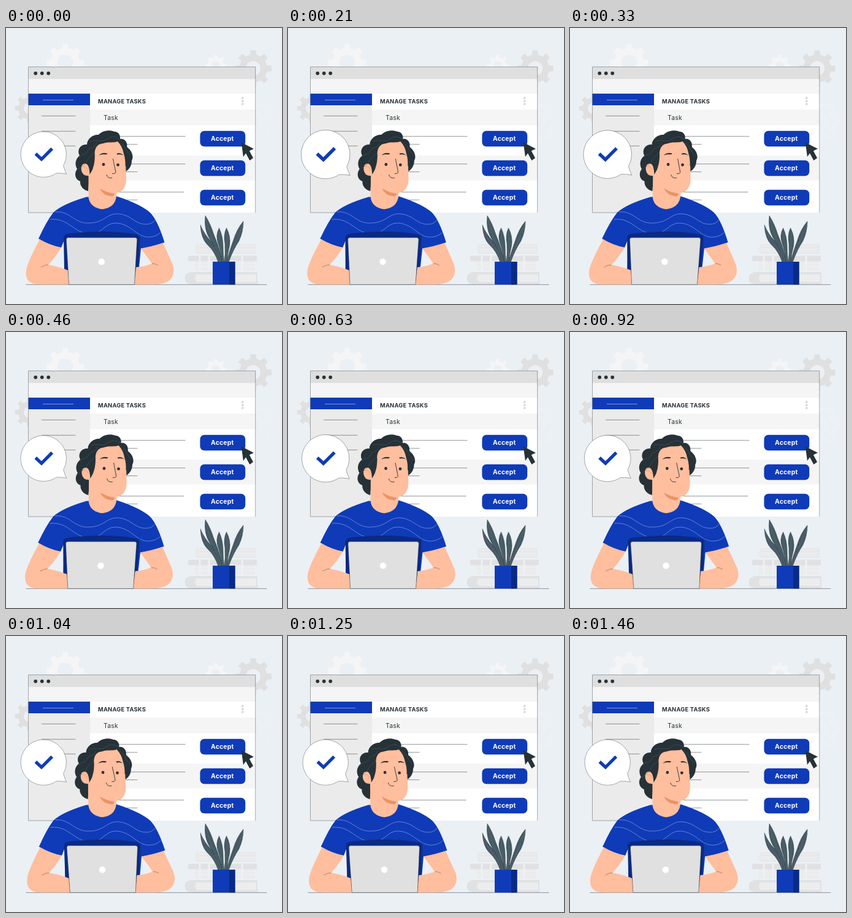
An HTML page that plays this animation: 450 by 450 pixels, repeating every 1500 ms.

```html
<!DOCTYPE html>
<html lang="en">
<head>
<meta charset="utf-8">
<title>Manage tasks</title>
<style>
  html, body { margin: 0; width: 100%; height: 100%; overflow: hidden; background: #ebf0f5; }
  svg { display: block; width: 100vw; height: 100vh; }
  text { font-family: Inter, "Open Sans", sans-serif; letter-spacing: .25px; }
  .blue { fill: #0f3bb8; }
  .navy { fill: #0a2a83; }
  .skin { fill: #ffbe9d; }
  .hair { fill: #263238; }
  .line { fill: none; stroke: #263238; stroke-width: .5; stroke-linecap: round; stroke-linejoin: round; }
  .thin { fill: none; stroke: #263238; stroke-width: .4; }
  .curl { fill: none; stroke: #53656e; stroke-width: .45; }
  .wave { fill: none; stroke: #b8c6ee; stroke-width: .5; }
  .leaf { fill: #455a64; stroke: #263238; stroke-width: .4; }
  .vein { fill: none; stroke: #72848c; stroke-width: .35; }
</style>
</head>
<body>
<svg viewBox="0 0 450 450">
  <rect width="450" height="450" fill="#ebf0f5"/>
  <g id="gears" fill-rule="evenodd"></g>

  <g id="window">
    <rect x="36.500" y="63.500" width="370.500" height="237.500" fill="#fff"/>
    <rect x="36.500" y="63.500" width="370.500" height="20" fill="#dfdfdf"/>
    <rect x="36.500" y="83.500" width="370.500" height="23.500" fill="#f5f5f5"/>
    <rect x="36.500" y="107" width="100.500" height="194" fill="#ebebeb"/>
    <rect x="36.500" y="107" width="100.500" height="19" class="blue"/>
    <rect x="137" y="133" width="270" height="25.500" fill="#f5f5f5"/>
    <rect x="137" y="208" width="270" height="40.500" fill="#f5f5f5"/>
    <path class="thin" d="M36.500 301V63.400H406.700V301M36.500 301H137"/>
    <path d="M60 117.500H110" stroke="#c9d3f0" stroke-width=".6"/>
    <path class="line" d="M58.500 143.300H113M58.500 168.300H113M58.500 192.300H113"/>
    <path class="line" d="M160 176.700H292M160 189.700H214M160 221.700H292M160 234.500H214M160 267.500H290M160 280.300H214"/>
    <g class="hair"><circle cx="48.200" cy="73.800" r="2.900"/><circle cx="58.700" cy="73.800" r="2.900"/><circle cx="69.200" cy="73.800" r="2.900"/></g>
    <g fill="#dcdcdc"><circle cx="385.700" cy="114.300" r="2"/><circle cx="385.700" cy="119.200" r="2"/><circle cx="385.700" cy="124" r="2"/></g>
    <text x="150" y="123.200" font-size="9.300" font-weight="700" fill="#263238">MANAGE TASKS</text>
    <text x="159" y="150" font-size="10.400" fill="#263238">Task</text>
    <g id="buttons"></g>
    <path d="M383.700 186.500L404 197L396.800 200.300L403 212L397.300 215.900L391 204.200L386.900 209.900Z" class="hair"/>
  </g>

  <g id="books">
    <path d="M312 352.500H404Q407 352.500 407 355V368H312Q308.500 366 308.500 360Q308.500 354 312 352.500Z" fill="#e6e8ea"/>
    <path d="M312 356H405M312 360.500H405M312 364H405" stroke="#f0f1f2" fill="none"/>
    <path d="M297 371.500H409V380H297Z" fill="#dfe1e3"/>
    <path d="M308 380H405V395H308Z" fill="#e8eaec"/>
    <path d="M309 384H405M309 388H405M309 391.500H405" stroke="#f0f1f2" fill="none"/>
    <path d="M316 371.500V395M331 371.500V395M385 371.500V395" stroke="#eff0f1" stroke-width="3"/>
    <path d="M301 398H410V418H301Q291.500 416 291.500 408Q291.500 400 301 398Z" fill="#dfe1e3"/>
    <path d="M311 401.500H408V414.500H311Q305 408 311 401.500Z" fill="#e9ebed"/>
    <path d="M311 405H408M311 408.500H408M311 412H408" stroke="#f0f1f2" fill="none"/>
  </g>

  <g id="plant">
    <path class="leaf" d="M346 382Q340 364 329 354Q318 344 317 321Q323 336 333 346Q347 360 349 382Z"/>
    <path class="leaf" d="M350 382Q343 360 333 345Q322 329 325 306Q333 318 339 337Q349 360 353 382Z"/>
    <path class="leaf" d="M352 382Q350 362 346 352Q341 338 347.500 326Q354 340 354 357Q354 371 356 382Z"/>
    <path class="leaf" d="M359 382Q365 362 370 348Q376 328 387 315Q387 332 380 347Q370 362 363 382Z"/>
    <path class="leaf" d="M356 382Q358 367 357 352Q354 337 359.500 326Q367 340 364.500 355Q361 369 360 382Z"/>
    <path class="vein" d="M318 327Q327 349 339 360Q345 368 347 380M326 311Q331 334 351 380M347.500 332Q349 358 354 380M360 331Q362 357 358 380M386 320Q376 348 361 380"/>
    <rect x="337" y="381" width="36.500" height="37.300" class="blue"/>
    <rect x="364" y="381" width="9.500" height="37.300" class="navy"/>
  </g>

  <path class="line" d="M33 418.400H425"/>

  <g id="person">
    <path class="hair" d="M134 266C126 264 120 257 121 250C112 247 111 236 116 230C111 221 114 213 120 208C115 198 122 189 132 190C132 180 143 173 151 174C156 168 168 165 177 169C184 169 187 176 186 181C193 179 199 187 197 194C205 199 209 210 205 216C205 224 201 231 195 234L184 205L150 205L142 230L136 240Z"/>
    <path class="blue" d="M131 275.500Q91 287.500 77 301Q66 315 53 343.500Q69 354 90 358L96 343L95 395L102 418H210L217 390L220 359.500Q242 356 258.500 349.500Q247 313 235 301Q220 287.500 181 274.500Z"/>
    <path class="skin" d="M134.500 237V276Q137 293 157 295.500Q178 293 180 274V258H160Z"/>
    <path class="skin" d="M136.500 239Q136 221.500 129 221Q122 221.500 122.700 231Q124 242 136.500 241Z"/>
    <path class="skin" d="M135 241Q140 236 142.500 226Q145 218 144.800 207C143.500 197 149 188.500 157 188.500C167 184.500 174 188 182 185Q190 189 192 198Q195 208 195 219L196 246Q196 263 184 268Q173 272 153 262L136 249Z"/>
    <path d="M153 261.500Q163 268 177 270Q176 275 172 274.500Q158 273 153 261.500Z" fill="#e8946b"/>
    <path class="hair" d="M182 185Q190 193 192 205Q195 214 194.500 225Q202 225 205 214L196 190Z"/>
    <path class="curl" d="M119 211C124 203 129 209 133 201C137 192 144 199 148 187M137 185C150 180 155 189 166 180C175 174 181 179 185 181M117 231C123 224 128 227 132 216C137 210 138 208 144 204M187 188C195 192 195 201 204 209"/>
    <path d="M126 227Q132 224 133 232" fill="none" stroke="#e8946b" stroke-width=".6"/>
    <g class="hair"><circle cx="159" cy="222.500" r="2.400"/><circle cx="182.500" cy="223.200" r="2.400"/></g>
    <path class="hair" d="M151.500 207.800Q156 202.300 165 204.300Q165 206.300 163 206.300Q156 205 151.500 207.800ZM180.500 204.600Q187 202.300 191.500 207.800Q187 205.300 181.500 206.500Z"/>
    <path class="line" style="stroke-width:.9" d="M174.500 213.500L179 235.500Q178 237.800 173.500 237.500M164 239.500Q166 246 172.800 244.300"/>

    <path class="wave" d="M80 300C104 297 111 320 136 318C160 318 165 301 184 303C205 305 211 321 229 320Q238 320 243 313"/>
    <path class="wave" d="M72 312C103 309 109 335 139 336C157 335 161 318 179 318C205 319 213 342 234 341Q246 340 252 333"/>
    <path class="navy" d="M94 342Q94 336.500 101 335.500Q165 327.500 213 336.500Q218 337.500 218 343L216 392L209 418H101L95 393Z"/>
    <path class="thin" d="M96 343Q91 346 89 357M219 359L218 341M217 326L219 343"/>

    <path class="skin" d="M55 344.500Q37 378 33.500 392Q28 418 55 418.300H103L101 395Q86 389 69 386Q80 375 90 358Q71 354 55 344.500Z"/>
    <path class="skin" d="M220 359.500Q239 356 256 350.500L269 379Q279 399 267 411Q259 418 240 418.300H209L212 390Q226 389 238 384Z"/>
    <path class="thin" d="M69 386Q62 386.500 57 390M238 384Q244 384 248 387"/>

    <path d="M101.500 341.800H210.500Q214 341.800 213.700 345.500L209.500 418.300H102.500L98.300 345.500Q98 341.800 101.500 341.800Z" fill="#e0e0e0" stroke="#263238" stroke-width=".5"/>
    <circle cx="155.700" cy="381" r="5.300" fill="#fff"/>
  </g>

  <g id="bubble">
    <path d="M93.500 224.300A37.100 37.100 0 1 0 82 236.800Q89 236 98.500 238Q95.500 232 93.500 224.300Z" fill="#fff" stroke="#263238" stroke-width=".4"/>
    <path d="M48.300 205L57.900 214L75.200 196.700" fill="none" stroke="#0f3bb8" stroke-width="5.200"/>
  </g>
</svg>
<script>
const $ = id => document.getElementById(id);
const LOOP = 1500, BEAT = 500, TEETH = 8;

function gear(cx, cy, r, hole, attrs) {
  const step = 2 * Math.PI / TEETH, pts = [];
  for (let i = 0; i < TEETH; i++) {
    for (const [a, k] of [[-.27, .77], [-.2, 1], [.2, 1], [.27, .77]]) {
      const w = (i + a) * step;
      pts.push((cx + r * k * Math.cos(w)).toFixed(1) + ' ' + (cy + r * k * Math.sin(w)).toFixed(1));
    }
  }
  const ring = `M${cx - hole} ${cy}a${hole} ${hole} 0 1 0 ${2 * hole} 0a${hole} ${hole} 0 1 0 ${-2 * hole} 0Z`;
  return `<path d="M${pts.join('L')}Z${ring}" ${attrs}/>`;
}

$('gears').innerHTML =
  gear(96.500, 56.500, 31.500, 13, 'fill="#f5f5f5"') +
  gear(342, 61, 17.500, 7, 'fill="#f5f5f5"') +
  gear(403, 66, 30, 12, 'fill="#e0e0e0"') +
  gear(38, 131, 23.500, 9, 'fill="#e0e0e0"') +
  gear(403, 152, 35, 15, 'fill="none" stroke="#f3f6f9" stroke-width=".7"');

$('buttons').innerHTML = [0, 1, 2].map(i => {
  const y = 167.700 + i * 48;
  return `<rect class="blue" x="316.400" y="${y}" width="73.800" height="25.500" rx="7"/>
    <text x="352.700" y="${y + 16}" font-size="10.300" font-weight="700" fill="#fff" text-anchor="middle">Accept</text>`;
}).join('');

// Leaning sway for the whole loop; two pulses of the bubble, then a rest.
function draw(now) {
  const t = now % LOOP;
  const lean = -.0155 * Math.sin(2 * Math.PI * t / LOOP);
  $('person').setAttribute('transform', `matrix(1 0 ${lean} 1 ${-lean * 290} 0)`);
  const pulse = t < 2 * BEAT ? Math.sin(Math.PI * t / BEAT) ** 2 : 0;
  $('bubble').setAttribute('transform', `translate(61 206) scale(${1 + .075 * pulse}) translate(-61 -206)`);
}

const start = performance.now();
function tick() {
  draw(performance.now() - start);
  requestAnimationFrame(tick);
}
tick();
</script>
</body>
</html>
```
